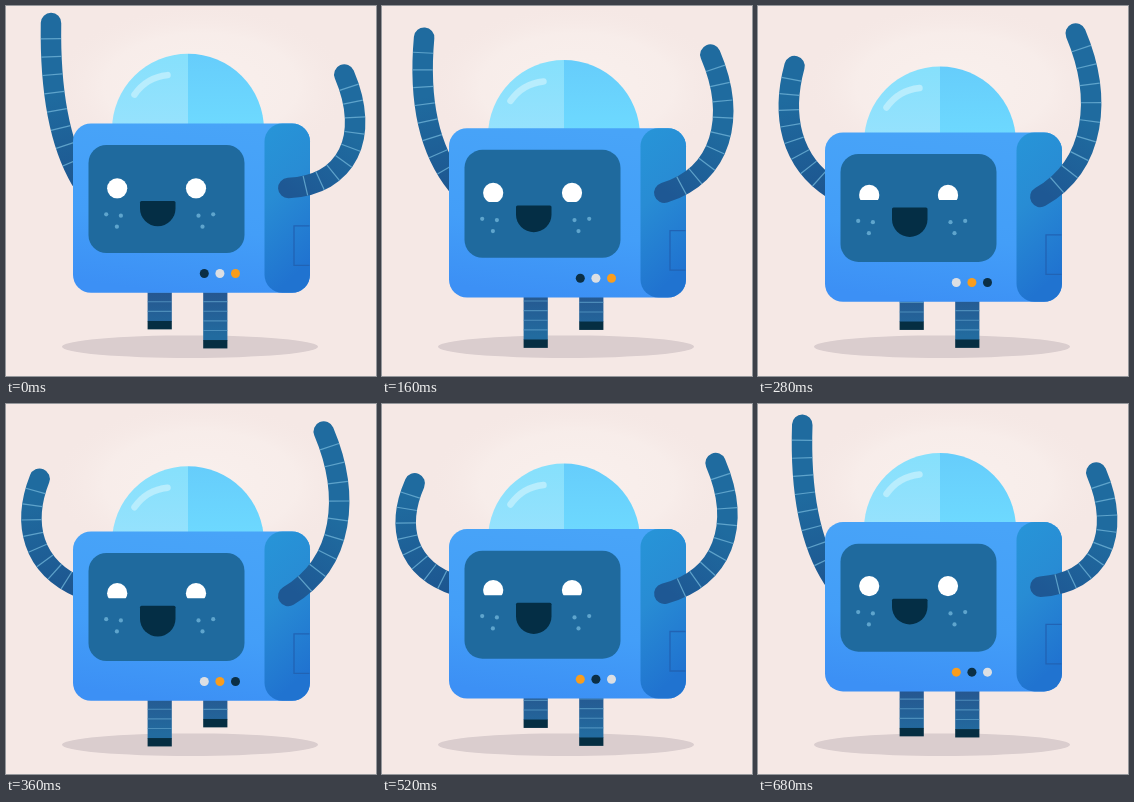
Write an HTML page that moves like this. It is 370 px wide and 370 px high and loops after 0.72 s.

```html
<!DOCTYPE html>
<html lang="en">
<head>
<meta charset="utf-8">
<title>Dancing robot</title>
<style>
  html, body { margin: 0; width: 100%; height: 100%; overflow: hidden; background: #f5e8e5; }
  svg { display: block; width: 100vw; height: 100vh; }
</style>
</head>
<body>
<svg viewBox="0 0 370 370">
  <defs>
    <radialGradient id="glow">
      <stop offset="0" stop-color="#f9f0ed"/>
      <stop offset=".65" stop-color="#f8eeeb" stop-opacity=".8"/>
      <stop offset="1" stop-color="#f5e8e5" stop-opacity="0"/>
    </radialGradient>
    <linearGradient id="front" x1=".6" x2=".4" y2="1">
      <stop offset="0" stop-color="#48a4f8"/>
      <stop offset=".6" stop-color="#439ef8"/>
      <stop offset="1" stop-color="#3c90f5"/>
    </linearGradient>
    <linearGradient id="side" x2=".25" y2="1">
      <stop offset="0" stop-color="#2795d8"/>
      <stop offset=".45" stop-color="#288cd4"/>
      <stop offset="1" stop-color="#2073d0"/>
    </linearGradient>
    <linearGradient id="glassL" x2="0" y2="1">
      <stop offset="0" stop-color="#86e0fc"/>
      <stop offset=".5" stop-color="#97e2fd"/>
    </linearGradient>
    <linearGradient id="glassR" x2="0" y2="1">
      <stop offset="0" stop-color="#66cdfb"/>
      <stop offset=".5" stop-color="#6edaff"/>
    </linearGradient>
    <linearGradient id="armL" gradientUnits="userSpaceOnUse" x1="45" y1="90" x2="70" y2="185">
      <stop offset="0" stop-color="#1f6b9f"/>
      <stop offset="1" stop-color="#1d5690"/>
    </linearGradient>
    <linearGradient id="armR" gradientUnits="userSpaceOnUse" x1="340" y1="125" x2="290" y2="190">
      <stop offset="0" stop-color="#1f6b9f"/>
      <stop offset="1" stop-color="#1e5894"/>
    </linearGradient>
    <linearGradient id="leg" gradientUnits="userSpaceOnUse" x1="0" y1="285" x2="0" y2="330">
      <stop offset="0" stop-color="#26568f"/>
      <stop offset="1" stop-color="#226b9f"/>
    </linearGradient>
    <clipPath id="lid"><rect id="lidBox" x="90" y="165" width="130"/></clipPath>
  </defs>

  <rect width="370" height="370" fill="#f5e8e5"/>
  <ellipse cx="195" cy="80" rx="150" ry="82" fill="url(#glow)"/>
  <ellipse cx="184" cy="340.7" rx="128" ry="11.3" fill="#dacdce"/>

  <g id="legs"></g>
  <g id="left"></g>

  <g id="dome">
    <path d="M182 47.6A76 76 0 0 0 182 199.6Z" fill="url(#glassL)"/>
    <path d="M182 47.6A76 76 0 0 1 182 199.6Z" fill="url(#glassR)"/>
    <path d="M128.5 88.5A46 46 0 0 1 161.5 69" fill="none" stroke="#b8edfd" stroke-width="6.5" stroke-linecap="round"/>
  </g>

  <g id="body">
    <rect x="67" y="117.4" width="237" height="169.4" rx="18" fill="url(#front)"/>
    <rect x="258.5" y="117.4" width="45.5" height="169.4" rx="18" fill="url(#side)"/>
    <path d="M303.5 219.8H288V259.3H303.5" fill="none" stroke="#2163b4" stroke-width="1.3"/>
    <rect x="82.5" y="139" width="156" height="108" rx="18" fill="#1f6a9e"/>
    <g id="lights"></g>
  </g>

  <g id="face">
    <g fill="#fff" clip-path="url(#lid)">
      <circle cx="111.2" cy="183" r="10.1"/>
      <circle cx="190" cy="183" r="10.1"/>
    </g>
    <path id="mouth" fill="#042e45"/>
    <g id="freckles" fill="#5fa5cd"></g>
  </g>

  <g id="right"></g>
</svg>
<script>
const LOOP = 720, STEP = 40, BEAT = 240;
const LIGHTS = ['#0b2f45', '#dcdfe3', '#f99d1c'];

const $ = id => document.getElementById(id);
const mix = (a, b, u) => a + (b - a) * u;
const clamp = (v, lo, hi) => Math.min(hi, Math.max(lo, v));

function add(parent, tag, attrs) {
  const el = document.createElementNS('http://www.w3.org/2000/svg', tag);
  for (const k in attrs) el.setAttribute(k, attrs[k]);
  return parent.appendChild(el);
}

function ease(u) {
  u = clamp(u, 0, 1);
  return u < .5 ? 2 * u * u : 1 - 2 * (1 - u) ** 2;
}

// 0 to 1 between start and top, back to 0 at end
const swing = (t, start, top, end) =>
  t < top ? ease((t - start) / (top - start)) : ease((end - t) / (end - top));

// how far the robot has sunk: 0 is high, 1 is low
function bob(t) {
  const a = t / LOOP * 2 * Math.PI;
  return .565 - .5 * Math.cos(a) - .06 * Math.sin(a) - .065 * Math.cos(2 * a);
}

// An arm runs from hand to shoulder and swings between two poses:
// hand x, y and two control points.
function makeArm(arm) {
  const g = $(arm.id);
  const limb = add(g, 'path', { fill: 'none', stroke: `url(#${arm.paint})`, 'stroke-width': 20.5, 'stroke-linecap': 'round' });
  const bands = add(g, 'path', { fill: 'none', stroke: '#69add3', 'stroke-width': 1.2, opacity: .85 });
  return t => {
    const u = swing(t, ...arm.timing);
    const p = arm.rest.map((v, i) => mix(v, arm.peak[i], u));
    const [sx, sy] = arm.shoulder;
    limb.setAttribute('d', `M${p[0]} ${p[1]}C${p.slice(2)} ${sx} ${sy + 10 * bob(t)}`);
    const len = limb.getTotalLength();
    let d = '';
    for (let k = 1; k < arm.parts; k++) {
      const s = len * (k - .12) / arm.parts;
      const a = limb.getPointAtLength(s - 1), b = limb.getPointAtLength(s + 1);
      const x = (a.x + b.x) / 2, y = (a.y + b.y) / 2;
      const size = Math.hypot(b.x - a.x, b.y - a.y);
      const nx = (a.y - b.y) / size * 10, ny = (b.x - a.x) / size * 10;
      d += `M${x - nx} ${y - ny}L${x + nx} ${y + ny}`;
    }
    bands.setAttribute('d', d);
  };
}

function makeLeg(x, dir) {
  const g = $('legs'), w = 24.2;
  const limb = add(g, 'rect', { x, y: 270, width: w, fill: 'url(#leg)' });
  const bands = add(g, 'path', { stroke: '#5d9fc9', 'stroke-width': 1.1, opacity: .7 });
  const foot = add(g, 'rect', { x, width: w, height: 8.4, fill: '#052e42' });
  return t => {
    const top = 324.5 - dir * 10.7 * Math.cos((t - 18) / BEAT * 2 * Math.PI);
    limb.setAttribute('height', top - 269.5);
    foot.setAttribute('y', top);
    let d = '';
    for (let k = 1; k < 6; k++) d += `M${x} ${top - 9.6 * k}h${w}`;
    bands.setAttribute('d', d);
  };
}

const leftTiming = [0, 480, LOOP];
const limbs = [
  makeLeg(141.6, 1),
  makeLeg(197.2, -1),
  makeArm({
    id: 'left', paint: 'armL', parts: 9, timing: leftTiming, shoulder: [75, 174],
    rest: [45, 17, 44, 80, 52, 135],
    peak: [32, 83, 12, 125, 22, 167]
  }),
  makeArm({
    id: 'right', paint: 'armR', parts: 10, timing: [10, 320, 620], shoulder: [282.3, 182],
    rest: [338.3, 68.5, 365, 131, 341, 179],
    peak: [317, 26, 344, 90, 338, 158]
  })
];

const lights = LIGHTS.map((_, i) => add($('lights'), 'circle', { cx: 198.3 + 15.6 * i, cy: 267.5, r: 4.5 }));
for (const [x, y] of [[53.5, 209], [38.8, 210.3], [42.8, 221.3]])
  for (const side of [-1, 1]) add($('freckles'), 'circle', { cx: 153.7 + side * x, cy: y, r: 2.1 });

const shift = (id, y) => $(id).setAttribute('transform', `translate(0 ${y})`);

function draw(t) {
  shift('body', 10 * bob(t));
  shift('dome', 14.8 * bob(t - 10));
  shift('face', 7 * bob(t + 45) - .9);
  limbs.forEach(move => move(t));
  $('lidBox').setAttribute('height', 18 + clamp(16 - 14 * bob(t), 5, 10.5));
  const low = 203.2 + 6.2 * swing(t, ...leftTiming);
  $('mouth').setAttribute('d',
    `M135.5 195.6H168Q169.5 195.6 169.5 197.1V${low}A17.75 17.75 0 0 1 134 ${low}V197.1Q134 195.6 135.5 195.6Z`);
  const beat = Math.floor(t / BEAT);
  lights.forEach((c, i) => c.setAttribute('fill', LIGHTS[(i + beat) % 3]));
}

const start = performance.now();
function tick() {
  const t = Math.max(0, performance.now() - start) % LOOP;
  draw(Math.floor(t / STEP) * STEP);
  requestAnimationFrame(tick);
}
tick();
</script>
</body>
</html>
```
